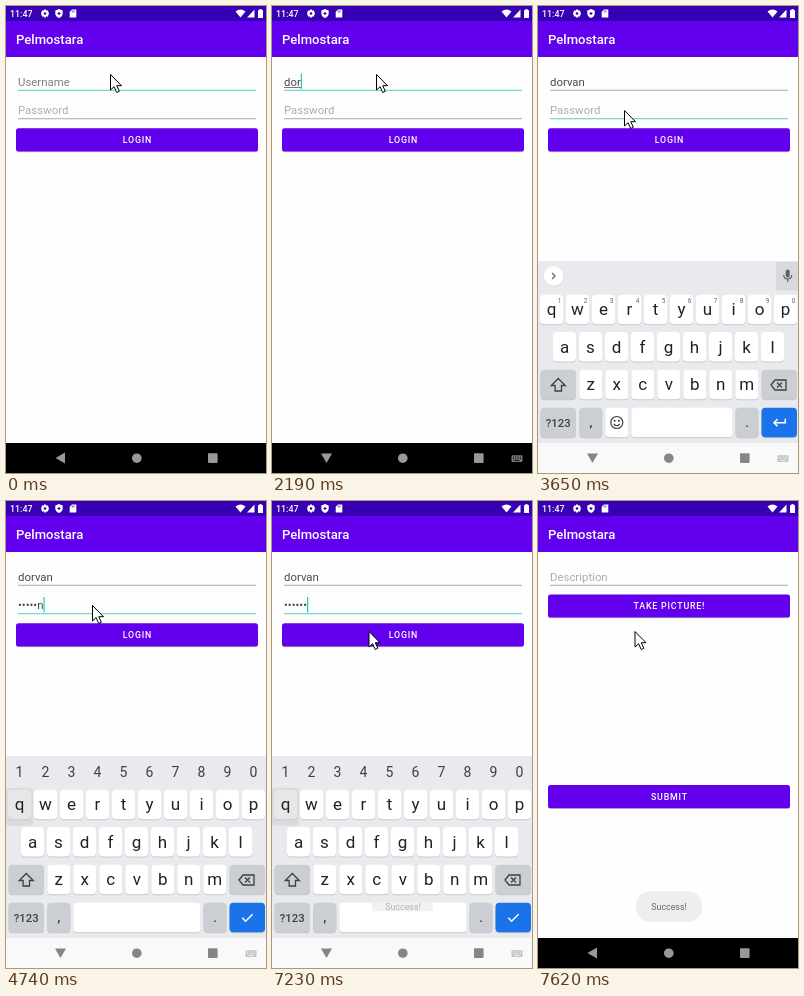
These frames come from a looping animation (260x467 px, 8 s). An HTML page with a canvas:

```html
<!DOCTYPE html>
<html lang="en">
<head>
<meta charset="utf-8">
<title>Login screen</title>
<style>
html, body { margin: 0; width: 100%; height: 100%; overflow: hidden; background: #fff; }
canvas { display: block; width: 260px; height: 467px; }
</style>
</head>
<body>
<canvas></canvas>
<script>
const LOOP = 8000, WIDTH = 260, HEIGHT = 467;
const USER = 'dorvan', TITLE = 'Pelmostara';
const PURPLE = '#6200ee', TEAL = '#55cbbd', INK = '#202124', ICON = '#5f6368';
const canvas = document.querySelector('canvas');
const ctx = canvas.getContext('2d');
const scale = window.devicePixelRatio || 1;
canvas.width = WIDTH * scale;
canvas.height = HEIGHT * scale;

// Value of the last step whose start time has passed.
const stepAt = (t, steps) => steps.reduce((value, [start, next]) => t >= start ? next : value, steps[0][1]);
const within = (t, ...spans) => spans.some(([from, to]) => t >= from && t < to);

const textFont = (size, weight = 400) => `${weight} ${size}px Roboto, sans-serif`;

function text(str, x, y, size, color, { weight = 400, align = 'left', spacing = 0 } = {}) {
  ctx.font = textFont(size, weight);
  ctx.letterSpacing = spacing + 'px';
  ctx.textAlign = align;
  ctx.fillStyle = color;
  ctx.fillText(str, x, y);
  ctx.letterSpacing = '0px';
}

function rect(x, y, w, h, color, radius = 0) {
  ctx.fillStyle = color;
  ctx.beginPath();
  ctx.roundRect(x, y, w, h, radius);
  ctx.fill();
}

function circle(x, y, r, color) {
  ctx.fillStyle = color;
  ctx.beginPath();
  ctx.arc(x, y, r, 0, 7);
  ctx.fill();
}

function shape(x, y, d, { fill, stroke, width = 1.2, angle = 0 }) {
  const path = new Path2D(d);
  ctx.save();
  ctx.translate(x, y);
  ctx.rotate(angle);
  ctx.lineWidth = width;
  if (fill) { ctx.fillStyle = fill; ctx.fill(path); }
  if (stroke) { ctx.strokeStyle = stroke; ctx.stroke(path); }
  ctx.restore();
}

function statusBar() {
  rect(0, 0, WIDTH, 15, '#3700b3');
  text('11:47', 4, 10.6, 8.85, '#fff', { weight: 500 });
  for (let i = 0; i < 4; i++) {
    shape(39, 7.5, 'M-4 -1H4V1H-4Z', { fill: '#fff', angle: i * Math.PI / 4 });
  }
  circle(39, 7.5, 3, '#fff');
  circle(39, 7.5, 1.3, '#3700b3');
  shape(53, 7.5, 'M0 -4.5L3.7 -3V0Q3.5 3 0 4.5Q-3.5 3 -3.7 0V-3Z', { fill: '#fff' });
  shape(53, 7.5, 'M-1.5 0H1.5M0 -1.5V1.5', { stroke: '#3700b3' });
  shape(67, 7.5, 'M-1 -4H3.3V4H-3.3V-1.7Z', { fill: '#fff' });
  shape(67, 7.5, 'M-.8 -3V-1M.9 -3V-1', { stroke: '#3700b3', width: .7 });
  shape(234.5, 11.5, 'M0 0L-5 -6Q0 -10 5 -6Z', { fill: '#fff' });
  shape(241, 11.5, 'M0 0H7.5V-8Z', { fill: '#fff' });
  rect(252, 4, 5, 8, '#fff', .6);
  rect(253.5, 3, 2, 1.5, '#fff');
}

function appFrame() {
  rect(0, 15, WIDTH, 422, '#fefefe');
  rect(0, 15, WIDTH, 36, PURPLE);
  text(TITLE, 10, 38, 13.1, '#fff', { weight: 500 });
  statusBar();
}

function button(label, y) {
  rect(10, y + .5, 242, 23.4, 'rgba(0,0,0,.2)', 2.5);
  rect(10, y, 242, 23.2, PURPLE, 2.5);
  text(label, 131.4, y + 15, 8.85, '#fff', { weight: 500, align: 'center', spacing: .79 });
}

function field(value, hint, baseline, { focused, caret, hintColor = '#acacac' } = {}) {
  text(value || hint, 12, baseline, 11.4, value ? '#484848' : hintColor);
  rect(12, baseline + 4, 238, 1, focused ? TEAL : '#aaa');
  if (caret) {
    ctx.font = textFont(11.4);
    rect(12 + ctx.measureText(value).width, baseline - 12.3, 1.2, 15.5, '#20c9b8');
  }
}

function loginScreen(t) {
  appFrame();
  const userLength = stepAt(t, [[0, 0], [1570, 1], [2070, 2], [2190, 3], [2330, 6]]);
  const passLength = stepAt(t, [[0, 0], [4020, 1], [4140, 2], [4380, 3], [4500, 4], [4620, 5], [4740, 6]]);
  const onPassword = t >= 3020;
  const lastShown = passLength && t < 6280;
  const password = lastShown ? '•'.repeat(passLength - 1) + USER[passLength - 1] : '•'.repeat(passLength);

  field(USER.slice(0, userLength), 'Username', 79.7, {
    focused: !onPassword,
    caret: within(t, [810, 1310], [1570, 3020]),
    hintColor: t < 250 ? '#808080' : '#acacac'
  });
  if (within(t, [1570, 3020])) {
    ctx.font = textFont(11.4);
    rect(12, 81, ctx.measureText(USER.slice(0, Math.min(userLength, 3))).width, .8, '#555');
  }
  field(password, 'Password', 108.3, {
    focused: onPassword,
    caret: within(t, [3140, 3650], [4020, 5240], [5760, 6280], [6690, 7380])
  });
  button('LOGIN', 122.3);
  if (within(t, [6160, 6280])) {
    ctx.save();
    ctx.beginPath();
    ctx.roundRect(10, 122.3, 242, 23.2, 2.5);
    ctx.clip();
    circle(112, 132, 115, 'rgba(255,255,255,.2)');
    ctx.restore();
  }
}

function postScreen() {
  appFrame();
  field('', 'Description', 79.7);
  button('TAKE PICTURE!', 93.4);
  button('SUBMIT', 284);
}

function navBar(t, keyboardOpen) {
  const color = keyboardOpen ? '#858585' : '#999';
  const turn = t < 7380 ? Math.min(1, Math.max(0, (t - 1570) / 360)) : 0;
  rect(0, 437, WIDTH, 30, keyboardOpen ? '#f9f9f9' : '#000');
  shape(54.5, 452, 'M-5 0L4.5 -5.5V5.5Z', { fill: color, angle: -turn * Math.PI / 2 });
  circle(130.8, 452.2, 4.8, color);
  rect(202, 447.3, 9.6, 9.6, color, .8);
  if (within(t, [1060, 7380])) {
    rect(239.5, 449.3, 11, 6.6, keyboardOpen ? '#c4c4c4' : '#777', .8);
    for (let i = 0; i < 8; i++) {
      rect(241 + i % 4 * 2.3, 450.5 + (i >> 2) * 1.8, 1, .9, keyboardOpen ? '#f9f9f9' : '#000');
    }
    rect(242.5, 454.2, 5, .8, keyboardOpen ? '#f9f9f9' : '#000');
  }
}

function key(x, y, w, color = '#fff') {
  rect(x, y + 1, w, 29.5, '#c5c7cb', 4);
  rect(x, y, w, 29.5, color, 4);
}

function letters(row, x, y, pressedKey) {
  [...row].forEach((letter, i) => {
    const left = x + i * 26;
    if (letter === pressedKey) rect(left - 2, y - 2, 27, 38, '#dadbdd', 3);
    key(left, y, 23, letter === pressedKey ? '#e7e7e7' : '#fff');
    text(letter, left + 11.5, y + 20.5, 17, INK, { align: 'center' });
  });
}

function toolbar(t) {
  const collapsed = t >= 2740;
  circle(15.5, 270.7, 10, '#d8dade');
  circle(15.5, 270, 9.8, '#fff');
  shape(15.5, 270, collapsed ? 'M-1.5 -3L1.5 0L-1.5 3' : 'M1.5 -3L-1.5 0L1.5 3', { stroke: ICON });
  if (!collapsed) {
    shape(50, 270, 'M2.3 -1.2A3.5 3.5 0 1 1 -4.7 -1.2A3.5 3.5 0 1 1 2.3 -1.2M1.2 1.4L5.3 5.5', { stroke: ICON, width: 1.4 });
    shape(88, 270, 'M-4.7 -4.7H4.7V1.5L1.5 4.7H-4.7ZM4.7 1.5H1.5V4.7M-2.5 0Q0 3.5 2.5 0M-2 -2.5V-1M2 -2.5V-1', { stroke: ICON });
  }
  if (t < 2880) {
    text('GIF', 126, 273.3, 9, ICON, { weight: 800, align: 'center', spacing: .4 });
    shape(164.5, 270.5, 'M-4.5 -5H4.5V5.5H-4.5ZM-2 -6H2V-3H-2ZM-2.3 0H2.3M-2.3 2.5H1.5', { stroke: ICON });
    for (let i = -1; i < 2; i++) circle(211 + i * 4.2, 270, 1.3, ICON);
  }
  if (t >= 3140) rect(238, 256, 22, 28.5, '#d7d9dd', 1);
  rect(247.7, 263.5, 4, 8, ICON, 2);
  shape(249.7, 270, 'M-4 -1Q-4 3 0 3Q4 3 4 -1M0 3V6', { stroke: ICON });
}

function keyboard(t) {
  const passwordLayout = t >= 4020, dark = '#cbced3';
  rect(0, 255, WIDTH, 182, '#e8eaed');
  if (!passwordLayout) toolbar(t);
  letters('qwertyuiop', 2, 288.7, passwordLayout ? 'q' : '');
  [...'1234567890'].forEach((digit, i) => {
    if (passwordLayout) text(digit, 13.5 + i * 26, 276, 14, '#3c4043', { align: 'center' });
    else text(digit, 21.7 + i * 26, 296.5, 6.5, ICON, { align: 'center' });
  });
  letters('asdfghjkl', 15, 326, '');
  letters('zxcvbnm', 41.3, 363.7, '');

  key(2.5, 363.7, 35.5, dark);
  shape(20.3, 379, 'M0 -6.5L7 .5H3.2V6H-3.2V.5H-7Z', { stroke: '#3c4043', width: 1.3 });
  key(223.5, 363.7, 35.5, dark);
  shape(241, 379, 'M-8 0L-4 -5H7V5H-4ZM-2 -2.5L3 2.5M3 -2.5L-2 2.5', { stroke: '#3c4043', width: 1.3 });

  key(2.5, 401.7, 35.5, dark);
  text('?123', 20.2, 420.7, 11.3, '#3c4043', { weight: 500, align: 'center' });
  key(41.3, 401.7, 23, dark);
  text(',', 52.8, 421, 14, INK, { align: 'center' });
  key(67.3, 401.7, passwordLayout ? 127.3 : 23);
  if (!passwordLayout) {
    key(93.3, 401.7, 101.3);
    shape(78.8, 416.5, 'M6 0A6 6 0 1 1 -6 0A6 6 0 1 1 6 0M-3 1.5Q0 5 3 1.5', { stroke: '#3c4043' });
    circle(76.7, 414.7, 1, '#3c4043');
    circle(80.9, 414.7, 1, '#3c4043');
  }
  key(197.5, 401.7, 23, dark);
  text('.', 209, 421, 14, INK, { align: 'center' });
  key(223.5, 401.7, 35.5, '#1a73e8');
  shape(241.3, 416.7, passwordLayout ? 'M-5 0L-1.7 3.5L5.3 -3.5' : 'M6 -4V0H-5M-1.8 -3.5L-5.3 0L-1.8 3.5',
    { stroke: '#fff', width: 1.6 });
}

function toast(t) {
  if (t < 7230) return;
  if (t < 7380) {
    rect(100, 401.7, 61, 8.5, '#f1f1f1', 1);
    text('Success!', 131, 409.3, 8.85, '#b4b4b4', { align: 'center' });
    return;
  }
  rect(98, 390.3, 66, 30.5, '#eee', 14);
  text('Success!', 131, 409.3, 8.85, '#666', { align: 'center' });
}

function pointer(t) {
  const [x, y] = stepAt(t, [
    [0, [104.5, 68.5]], [2620, [97.5, 80.5]], [2740, [89.5, 93.5]],
    [2880, [86.5, 104.5]], [5640, [92.5, 118.5]], [5760, [97, 130.5]]
  ]);
  shape(x, y, 'M0 0V15.5L3.6 12.2L6.2 18L8.8 16.8L6.3 11.2H11Z', { fill: '#fff', stroke: '#000', width: 1 });
}

function draw(t) {
  const keyboardOpen = within(t, [2330, 7380]);
  ctx.setTransform(scale, 0, 0, scale, 0, 0);
  if (t < 7620) loginScreen(t);
  if (t >= 7380) {
    const [alpha, shift] = stepAt(t, [[7380, [.35, 16]], [7500, [.85, 4]], [7620, [1, 0]]]);
    ctx.save();
    ctx.globalAlpha = alpha;
    ctx.translate(0, shift);
    postScreen();
    ctx.restore();
  }
  if (keyboardOpen) keyboard(t);
  navBar(t, keyboardOpen);
  toast(t);
  pointer(t);
}

const start = performance.now();
function tick() {
  draw((performance.now() - start) % LOOP);
  requestAnimationFrame(tick);
}
tick();
</script>
</body>
</html>
```
